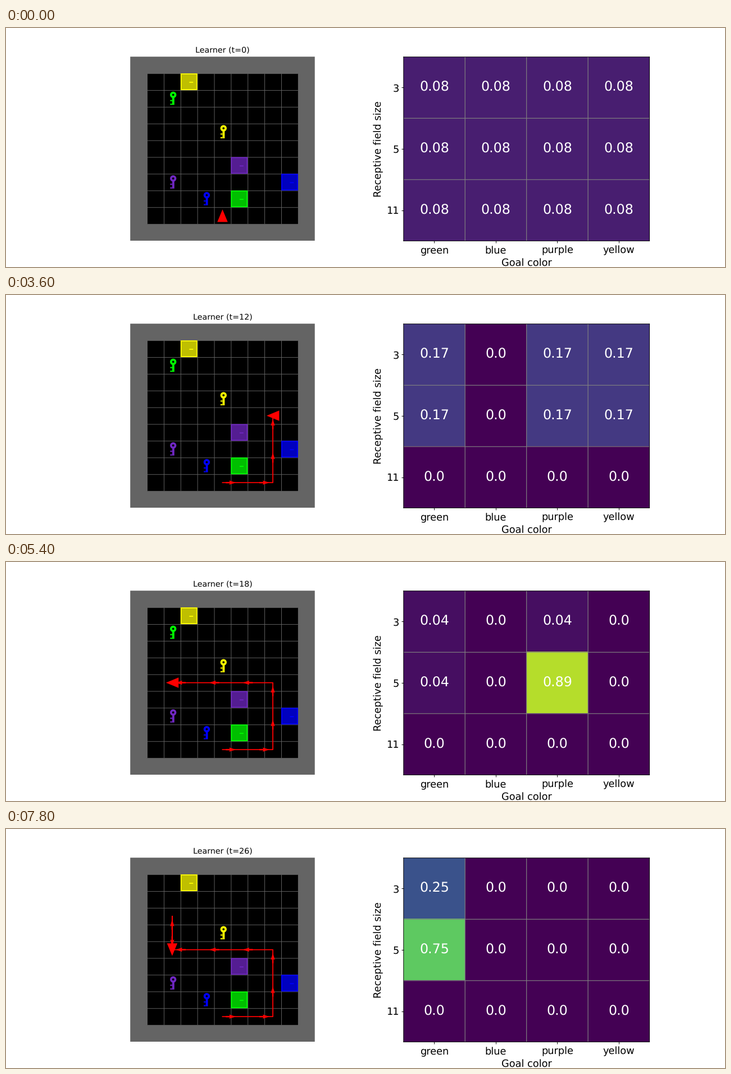
A matplotlib script for the animation above (8 s loop, 1280 by 427 pixels).

```python
import numpy as np
import matplotlib.pyplot as plt
from matplotlib.animation import FuncAnimation
from matplotlib.patches import Circle, Polygon, Rectangle

DPI = 128
K = 2 / 3  # point sizes relative to a 15 x 5 inch layout
FRAMES, INTERVAL, PER_STEP = 80, 100, 3

plt.rcParams.update({
    "font.family": "DejaVu Sans", "text.hinting": "none", "path.snap": False,
    "axes.titlesize": 12 * K, "axes.titlepad": 6 * K,
    "axes.labelsize": 15 * K, "axes.labelpad": 4 * K,
    "axes.linewidth": 0.8 * K,
    **{f"{a}tick.{p}": v * K for a in "xy" for p, v in
       (("labelsize", 15), ("major.size", 3.5),
        ("major.width", 0.8), ("major.pad", 3.5))},
})

COLORS = {"green": (0, 255, 0), "blue": (0, 0, 255),
          "purple": (112, 39, 195), "yellow": (255, 255, 0)}
COLORS = {n: np.array(c) / 255 for n, c in COLORS.items()}
KEYS = {"green": (2, 2), "blue": (4, 8), "purple": (2, 7), "yellow": (5, 4)}
DOORS = {"green": (6, 8), "blue": (9, 7), "purple": (6, 6), "yellow": (3, 1)}
FIELDS = (3, 5, 11)
GRAY = (100 / 255,) * 3
N = 11

# R/L turn, F step forward, P pick up the key ahead
ACTIONS = "R" + "F" * 3 + "L" + "F" * 4 + "R" * 3 + "F" * 6 + "RFFPRRFF"


def turn_right(d):
    return np.array([-d[1], d[0]])


def act(pos, d, action):
    if action == "F":
        return pos + d, d
    if action == "P":
        return pos, d
    return pos, turn_right(d) * (1 if action == "R" else -1)


def offset(pos, d, key):
    """Distance ahead and to the side."""
    v = np.subtract(key, pos)
    return v @ d, abs(v @ turn_right(d))


def cost(pos, d, key):
    ahead, side = offset(pos, d, key)
    turns = 2 if ahead < 0 else int(side > 0)
    return abs(ahead) + side + turns


def infer(w, before, after):
    """Reweight goals whose key was in view, by how well the action fits."""
    w = w.copy()
    for r, size in enumerate(FIELDS):
        for c, name in enumerate(COLORS):
            key = KEYS[name]
            ahead, side = offset(*before, key)
            if 0 <= ahead < size and side <= size // 2:
                closer = cost(*after, key) < cost(*before, key)
                aligned = after[0][0] == key[0]
                w[r, c] *= closer * (3 if aligned else 2)
    return w


def simulate():
    state = np.array([5, 9]), np.array([0, -1])
    w = np.ones((len(FIELDS), len(COLORS)))
    path, steps, held = [state[0]], [], None
    steps.append((*state, 1, w / w.sum(), held))
    for a in ACTIONS:
        new = act(*state, a)
        if a == "F":
            path.append(new[0])
        if a == "P":
            held = next(n for n in KEYS if KEYS[n] == tuple(sum(state)))
            w = w * [n == held for n in COLORS]
        elif held is None:
            w = infer(w, state, new)
        state = new
        steps.append((*state, len(path), w / w.sum(), held))
    return steps, np.array(path) + 0.5


fig = plt.figure(figsize=(1280 / DPI, 427 / DPI), dpi=DPI, facecolor="white")


def add_axes(x, y, w, h):
    return fig.add_axes([x / 1500, y / 500, w / 1500, h / 500])


world = add_axes(259.2, 55, 385, 385)
heat = add_axes(829.4, 54.5, 513.1, 385)


def rect(x0, x1, y0, y1, color, z=1):
    return world.add_patch(Rectangle((x0, y0), x1 - x0, y1 - y0,
                                     fc=color, lw=0, zorder=z))


def draw_door(x, y, c):
    rect(x, x + 1, y, y + 1, c, 2)
    rect(x + 0.06, x + 0.94, y + 0.06, y + 0.94, c * 0.75, 2.1)
    rect(x + 0.52, x + 0.75, y + 0.50, y + 0.56, c, 2.2)


def draw_key(x, y, c):
    parts = [rect(x + a, x + b, y + e, y + f, c, 2) for a, b, e, f in
             ((0.50, 0.63, 0.31, 0.88), (0.38, 0.50, 0.59, 0.66),
              (0.38, 0.50, 0.81, 0.88))]
    for r, col in ((0.19, c), (0.064, "black")):
        parts.append(world.add_patch(Circle((x + 0.56, y + 0.28), r,
                                            fc=col, lw=0, zorder=2.1)))
    return parts


# Grid world
world.axis("off")
rect(0, N, 0, N, GRAY)
rect(1, N - 1, 1, N - 1, "black", 1.1)
for k in range(1, N - 1):
    rect(k, k + 1 / 32, 1, N - 1, GRAY, 1.2)
    rect(1, N - 1, k, k + 1 / 32, GRAY, 1.2)
for name, cell in DOORS.items():
    draw_door(*cell, COLORS[name])
keys = {name: draw_key(*cell, COLORS[name]) for name, cell in KEYS.items()}

steps, path = simulate()
trail, = world.plot([], [], color="red", lw=1.5 * K, zorder=3)
agent = world.add_patch(Polygon(np.zeros((3, 2)), fc="red", lw=0, zorder=4))
arrows = [world.quiver(*(a + b) / 2, *(b - a), color="red", pivot="mid",
                       angles="xy", units="width", width=0.0075,
                       scale=18, zorder=3.5)
          for a, b in zip(path[:-1:2], path[1::2])]
world.set(xlim=(0, N), ylim=(N, 0))
title = world.set_title("")

# Belief heat map
image = heat.imshow(steps[0][3], cmap="viridis", vmin=0, vmax=1,
                    interpolation="nearest", aspect="auto")
heat.set_xticks(range(len(COLORS)), COLORS)
heat.set_yticks(range(len(FIELDS)), FIELDS)
heat.set(xlabel="Goal color", ylabel="Receptive field size")
for k in range(1, len(COLORS)):
    heat.axvline(k - 0.5, color="gray", lw=K)
for k in range(1, len(FIELDS)):
    heat.axhline(k - 0.5, color="gray", lw=K)
labels = {rc: heat.text(rc[1], rc[0], "", color="white", fontsize=20 * K,
                        ha="center", va="center")
          for rc in np.ndindex(len(FIELDS), len(COLORS))}


def update(i):
    t = i // PER_STEP
    pos, d, count, belief, held = steps[t]
    agent.set_xy([pos + 0.5 + u * d + v * turn_right(d) for u, v in
                  ((-0.38, -0.31), (0.37, 0), (-0.38, 0.31))])
    trail.set_data(*path[:count].T)
    for k, arrow in enumerate(arrows):
        arrow.set_visible(2 * k + 1 < count)
    for name, parts in keys.items():
        for part in parts:
            part.set_visible(name != held)
    title.set_text(f"Learner (t={t})")
    image.set_data(belief)
    for rc, label in labels.items():
        label.set_text(str(round(float(belief[rc]), 2)))
    return []


anim = FuncAnimation(fig, update, frames=FRAMES, interval=INTERVAL,
                     init_func=lambda: update(0), repeat=True, repeat_delay=0)
plt.show()
```
